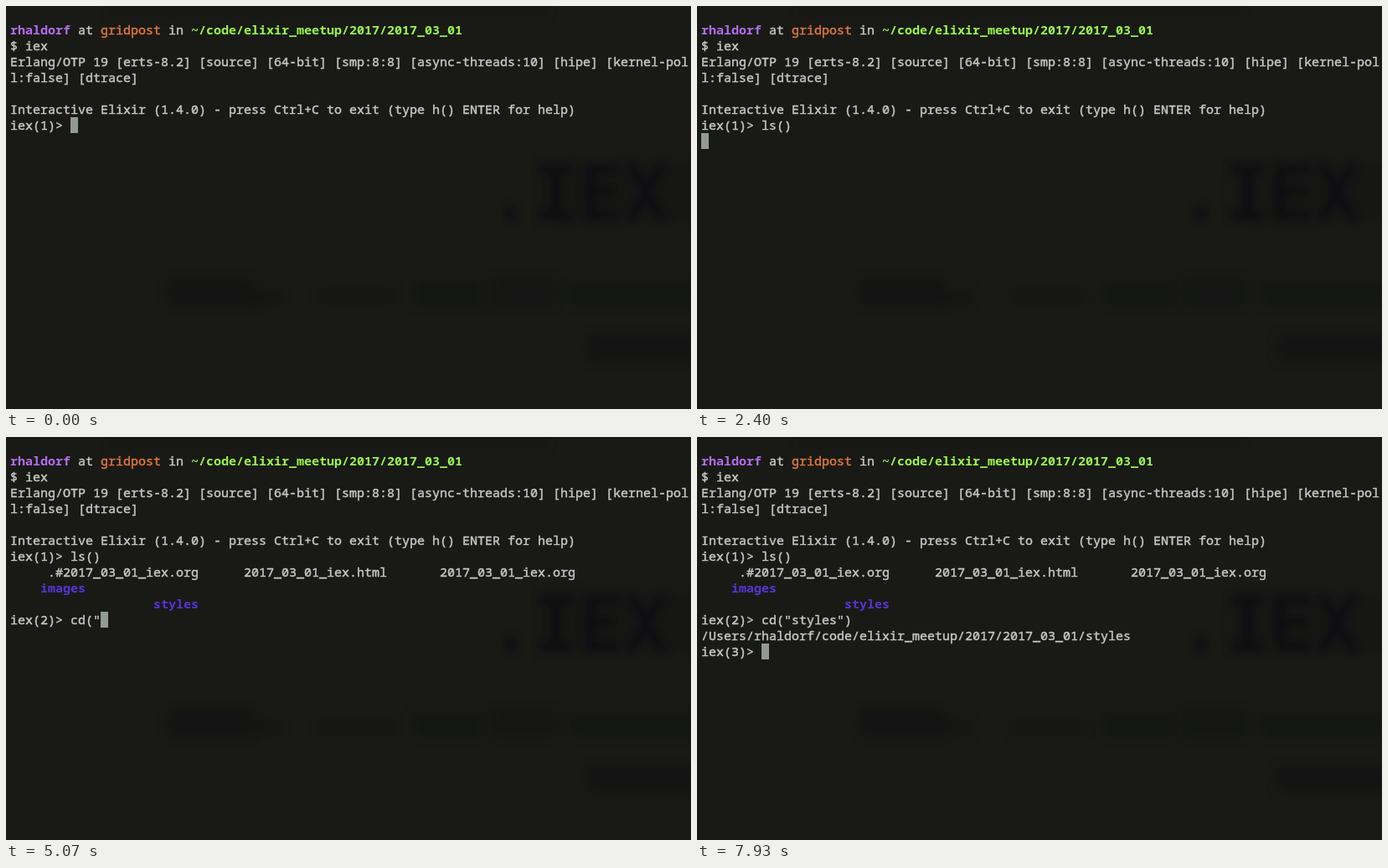
An HTML page with a canvas that plays this animation: 818 by 482 pixels, repeating every 8000 ms.

```html
<!DOCTYPE html>
<html lang="en">
<head>
<meta charset="utf-8">
<title>Terminal session</title>
<style>
  html, body { margin: 0; width: 100%; height: 100%; overflow: hidden; background: #191a16; }
  canvas { display: block; width: 818px; height: 482px; }
</style>
</head>
<body>
<canvas id="stage"></canvas>
<script>
const W = 818, H = 482, LOOP = 8000;
const LEFT = 5, TOP = 19, COL = 9, ROW = 19, BASE = 15;
const FAMILY = '15px "Noto Sans Mono", "DejaVu Sans Mono", monospace';
const USER = 'rhaldorf', HOST = 'gridpost';
const DIR = 'code/elixir_meetup/2017/2017_03_01';
const C = {
  text: '#c6c8c0', user: '#b56cf0', host: '#e2773f', path: '#9af84c',
  folder: '#5733d2', cursor: '#929a93', back: '#191a16'
};

const dpr = window.devicePixelRatio || 1;

function makeCanvas(canvas) {
  canvas.width = Math.round(W * dpr);
  canvas.height = Math.round(H * dpr);
  const g = canvas.getContext('2d');
  g.scale(dpr, dpr);
  g.lineJoin = 'round';
  return g;
}

const stage = document.getElementById('stage');
const ctx = makeCanvas(stage);

// A hairline outline lifts the regular weight to a medium one.
function put(g, col, row, text, color = C.text, bold = false) {
  const x = LEFT + col * COL, y = TOP + row * ROW + BASE;
  g.font = (bold ? 'bold ' : '') + FAMILY;
  g.fillStyle = g.strokeStyle = color;
  g.fillText(text, x, y);
  if (!bold) {
    g.lineWidth = 0.45;
    g.strokeText(text, x, y);
  }
}

// Blurred window contents showing faintly through the terminal.
function drawGhost(g) {
  const ink = (alpha, blur) => {
    g.filter = `blur(${blur}px)`;
    g.fillStyle = `rgba(13, 14, 17, ${alpha})`;
  };
  const smudge = (x, y, w, h, alpha, blur) => {
    ink(alpha, blur);
    g.fillRect(x, y, w, h);
  };
  ink(0.75, 4);
  g.font = 'bold 90px "DejaVu Sans Mono", monospace';
  g.fillText('.IEX', 575, 256);
  smudge(640, 188, 190, 70, 0.2, 7);
  smudge(194, 326, 100, 32, 0.42, 6);
  smudge(294, 338, 36, 20, 0.32, 5);
  smudge(372, 336, 94, 22, 0.24, 5);
  smudge(484, 330, 88, 28, 0.3, 6);
  smudge(582, 326, 74, 32, 0.36, 6);
  smudge(672, 330, 160, 28, 0.3, 6);
  smudge(692, 394, 140, 30, 0.42, 6);
  smudge(120, 2, 530, 12, 0.16, 5);
  g.filter = 'none';
}

function drawBanner(g) {
  put(g, 0, 0, USER, C.user, true);
  put(g, 9, 0, 'at');
  put(g, 12, 0, HOST, C.host);
  put(g, 21, 0, 'in');
  put(g, 24, 0, '~/' + DIR, C.path, true);
  put(g, 0, 1, '$ iex');
  put(g, 0, 2, 'Erlang/OTP 19 [erts-8.2] [source] [64-bit] [smp:8:8] [async-threads:10] [hipe] [kernel-pol');
  put(g, 0, 3, 'l:false] [dtrace]');
  put(g, 0, 5, 'Interactive Elixir (1.4.0) - press Ctrl+C to exit (type h() ENTER for help)');
}

const backdrop = document.createElement('canvas');
const bg = makeCanvas(backdrop);
bg.fillStyle = C.back;
bg.fillRect(0, 0, W, H);
drawGhost(bg);
drawBanner(bg);

// Each command: its row, key times, Enter, and when its output lands.
const LS = {
  row: 6, prompt: 'iex(1)> ', text: 'ls()',
  keys: [1450, 1660, 1900, 2110], enter: 2330, done: 2540
};
const CD = {
  row: 10, prompt: 'iex(2)> ', text: 'cd("styles")',
  keys: [4560, 4720, 4880, 5020, 5300, 5480, 5680, 5920, 6130, 6350, 6600, 6860],
  enter: 7240, done: 7430
};

const typed = (cmd, t) => cmd.keys.filter(k => k <= t).length;

function drawListing() {
  put(ctx, 5, 7, '.#2017_03_01_iex.org');
  put(ctx, 31, 7, '2017_03_01_iex.html');
  put(ctx, 57, 7, '2017_03_01_iex.org');
  put(ctx, 4, 8, 'images', C.folder, true);
  put(ctx, 19, 9, 'styles', C.folder, true);
}

function cursorAt(t) {
  if (t >= CD.done) return { col: 8, row: 12, since: CD.done };
  const cmd = t < LS.done ? LS : CD;
  if (t >= cmd.enter) return { col: 0, row: cmd.row + 1, since: cmd.enter };
  const n = typed(cmd, t);
  // A closing bracket sends the cursor back to its partner.
  const pos = n === cmd.text.length ? cmd.text.indexOf('(') : n;
  const start = cmd === LS ? 0 : LS.done;
  return { col: 8 + pos, row: cmd.row, since: n ? cmd.keys[n - 1] : start };
}

function drawCursor(t) {
  const { col, row, since } = cursorAt(t);
  if ((t - since) % 1000 >= 510) return;
  ctx.fillStyle = C.cursor;
  ctx.fillRect(LEFT + col * COL, TOP + row * ROW, COL, ROW);
}

function drawCommand(cmd, t) {
  put(ctx, 0, cmd.row, cmd.prompt + cmd.text.slice(0, typed(cmd, t)));
}

function draw(t) {
  ctx.drawImage(backdrop, 0, 0, W, H);
  drawCursor(t);
  drawCommand(LS, t);
  if (t >= LS.done) {
    drawListing();
    drawCommand(CD, t);
  }
  if (t >= CD.done) {
    put(ctx, 0, 11, `/Users/${USER}/${DIR}/styles`);
    put(ctx, 0, 12, 'iex(3)> ');
  }
}

const began = performance.now();

function tick() {
  draw((performance.now() - began) % LOOP);
  requestAnimationFrame(tick);
}

tick();
</script>
</body>
</html>
```
